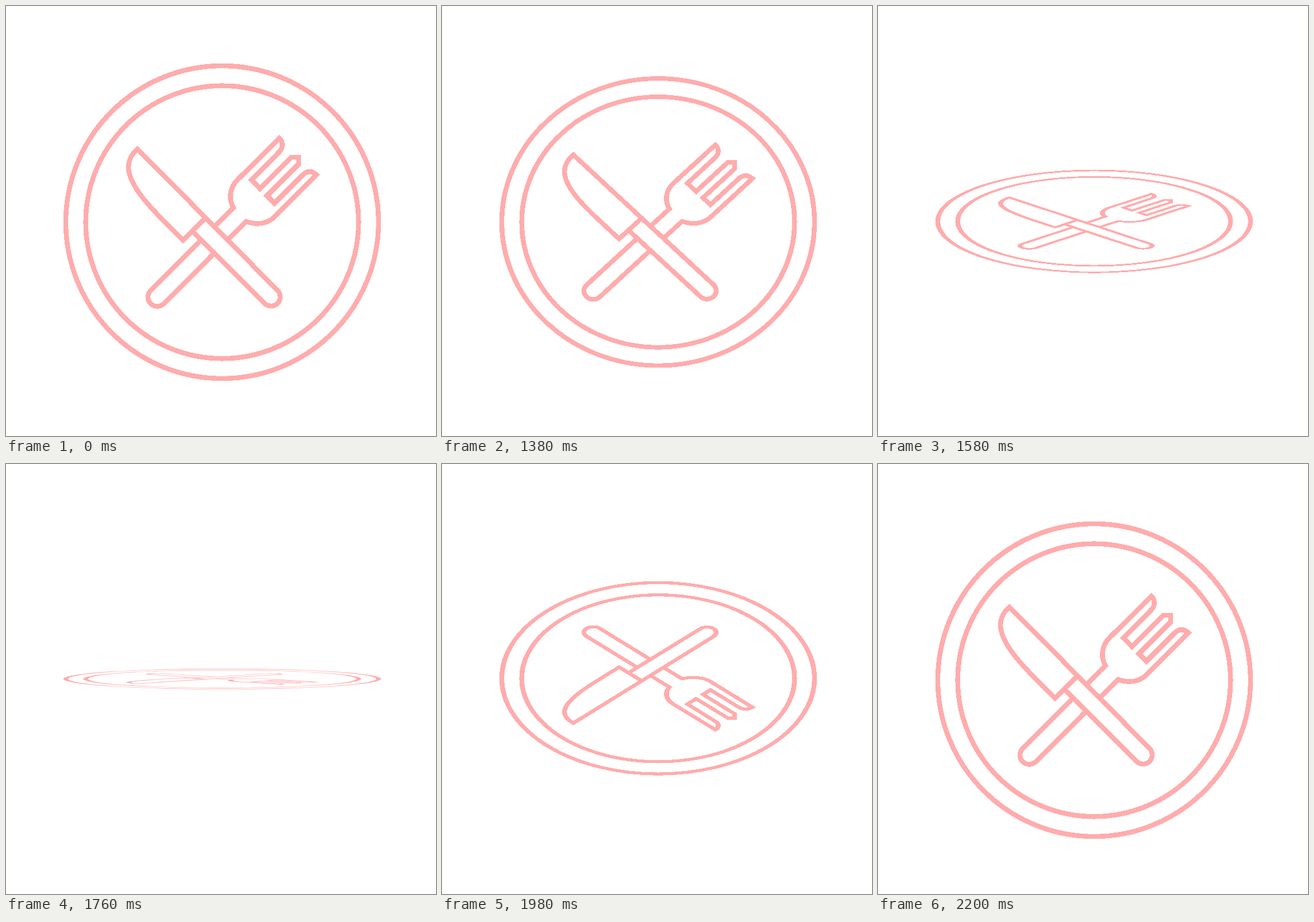
Write an HTML page that moves like this. It is 748 by 748 pixels and loops after 3 s.

```html
<!DOCTYPE html>
<html lang="en">
<head>
<meta charset="utf-8">
<title>Flipping plate</title>
<style>
  html, body { margin: 0; height: 100%; overflow: hidden; background: #fff; }
  svg { display: block; width: 100vw; height: 100vh; }
</style>
</head>
<body>
<svg viewBox="0 0 748 748" shape-rendering="crispEdges">
  <g id="plate" fill="none" stroke="#ffacad" stroke-width="8.5" stroke-miterlimit="10">
    <circle cx="376" cy="376" r="272"/>
    <circle cx="376" cy="376" r="237.3"/>
    <!-- knife: blade, then handle -->
    <path d="M347 369 L308 407.8 L262 361 C236 334 219 311 214.5 291 C210 274 217 259 228.5 248.6
             L472.8 495.2 A16 16 0 0 1 450.2 517.8 L324.5 391.5"/>
    <path d="M308 407.8 L347 369"/>
    <!-- fork: handle end, then head -->
    <path d="M339.5 407 L251.7 495 A16 16 0 0 0 274.5 517.8 L362.5 429.5"/>
    <path d="M362 384.4 L395.5 351 C387 335 389 316 403 302 L475.5 229.8
             C482 236 482.5 246 475.5 253.5 L427 302.5 L442 318 L497 263 H509 V275 L454 330 L467 343
             L517 293 C525 285.5 533 287.5 540 293.5 L468 366 C454 380 435 381 417.5 374.8 L385 407"/>
  </g>
</svg>
<script>
  const plate = document.getElementById("plate");
  const LOOP = 3000, STEP = 20, AXIS = 374;
  const progress = (t, from, to) => Math.min(1, Math.max(0, (t - from) / (to - from)));

  // Quarter turns completed: eases to edge-on, speeds up to the back, then snaps upright.
  function turns(t) {
    if (t >= 2200) return 0;
    if (t > 1740) return 1 + progress(t, 1700, 2200) ** 1.5;
    const p = progress(t, 1200, 1740);
    return p * p * (3 - 2 * p);
  }

  function draw() {
    const t = Math.floor(performance.now() % LOOP / STEP) * STEP;
    const scale = Math.cos(turns(t) * Math.PI / 2);
    plate.setAttribute("transform", `matrix(1 0 0 ${scale.toFixed(5)} 0 ${(AXIS * (1 - scale)).toFixed(3)})`);
    requestAnimationFrame(draw);
  }
  draw();
</script>
</body>
</html>
```
